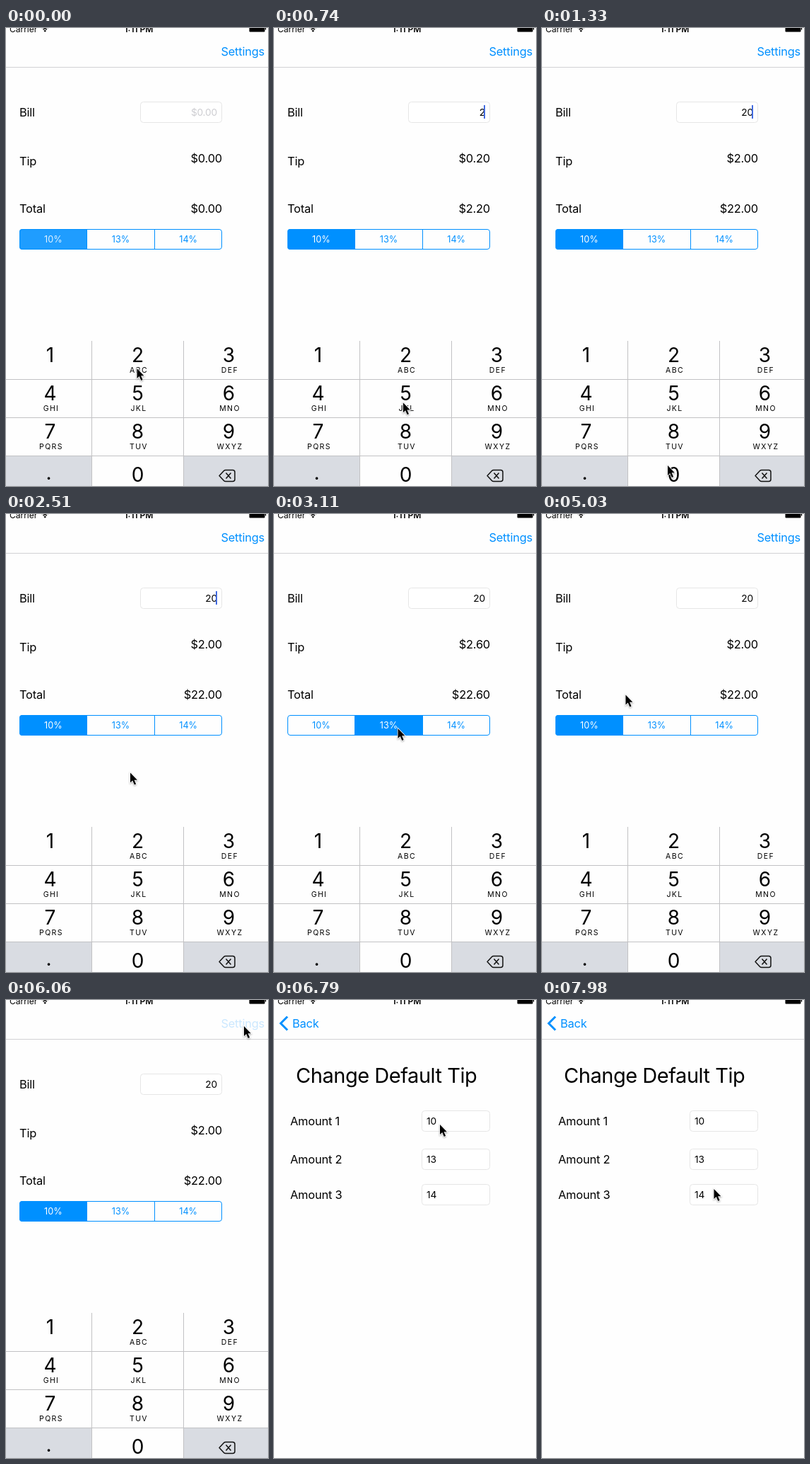
An HTML page that plays this animation: 371x647 px, repeating every 8 s.

```html
<!DOCTYPE html>
<html lang="en">
<head>
<meta charset="utf-8">
<title>Tip calculator</title>
<style>
  html, body { margin: 0; width: 100%; height: 100%; overflow: hidden; background: #fefefe; }
  svg { display: block; width: 100vw; height: 100vh; }
  text { font: 16.4px Inter, sans-serif; letter-spacing: -.012em; white-space: pre; }
  .small { font-size: 13.7px; }
  .segment { font-size: 12.7px; letter-spacing: 0; }
  .title { font-size: 29px; letter-spacing: -.016em; }
  .status { font-size: 12px; letter-spacing: 0; }
  .bold { font-weight: 600; }
  .digit { font-size: 28px; letter-spacing: 0; }
  .letters { font-size: 10.5px; letter-spacing: 1.4px; }
  .blue { fill: #0090ff; }
  .page { fill: #fefefe; }
  .grey { fill: #d9dce2; }
  .field { fill: #fff; stroke: #e6e6e6; }
  .line { fill: none; stroke: #c2c2c4; }
  .end { text-anchor: end; }
  .mid { text-anchor: middle; }
</style>
</head>
<body>
<svg id="stage" viewBox="0 0 371 647"></svg>
<script>
const WIDTH = 371, LOOP = 8000, BLUE = '#0090ff';
const STEP = 147.7; // ms the picture holds; all times below count these steps

const RATES = [10, 13, 14];
const SEGMENT = 287 / 3;

const START = { x: 185.5, y: 481 };
const MOVES = [
  { from: 3, to: 8, x: 178, y: 618 },     // the 0 key
  { from: 12, to: 19, x: 175.5, y: 303 }, // 13%
  { from: 21, to: 24, x: 248, y: 300 },   // 14%
  { from: 26, to: 28, x: 169.5, y: 299 }, // 13%
  { from: 30, to: 32, x: 78, y: 296 },    // 10%
  { from: 32, to: 40, x: 337, y: 37 },    // Settings
  { from: 43, to: 46, x: 235, y: 176 },   // first amount
  { from: 50, to: 54, x: 243.5, y: 267 }, // third amount
];
const SELECTIONS = [
  { at: -1, index: 0 }, { at: 19.5, index: 1 }, { at: 24.5, index: 2 },
  { at: 28, index: 1 }, { at: 31.5, index: 0 },
];

const $ = id => document.getElementById(id);
const clamp = v => Math.max(0, Math.min(1, v));
const smooth = v => v * v * (3 - 2 * v);
const text = (x, y, content, cls = '', id = '') =>
  `<text x="${x}" y="${y}" class="${cls}" id="${id}">${content}</text>`;
const rect = (x, y, w, h, cls, id = '', rx = 0) =>
  `<rect x="${x}" y="${y}" width="${w}" height="${h}" rx="${rx}" class="${cls}" id="${id}"/>`;
const field = (x, y, w) => rect(x + .5, y + .5, w - 1, 29, 'field', '', 4);

const keys = ['', 'ABC', 'DEF', 'GHI', 'JKL', 'MNO', 'PQRS', 'TUV', 'WXYZ'].map((letters, i) => {
  const x = 62.5 + 126.5 * (i % 3) - (i % 3 === 1 ? 2.5 : 0);
  const y = 472 + 54 * Math.floor(i / 3);
  return text(x, y, i + 1, 'digit mid') + text(x + 1.5, y + 15, letters, 'letters mid');
}).join('');

const segments = RATES.map((rate, i) =>
  rect(19 + SEGMENT * i, 284, SEGMENT, 29, 'blue', 'fill' + i) +
  text(19 + SEGMENT * (i + .5), 303, rate + '%', 'segment mid', 'rate' + i)).join('');

const amounts = [156, 210, 260].map((y, i) =>
  text(23, y + 21, 'Amount ' + (i + 1)) + field(209, y, 97) +
  text(216, y + 20, RATES[i], 'small')).join('');

$('stage').innerHTML = `
<clipPath id="round"><rect x="19" y="284" width="287" height="29" rx="4"/></clipPath>
${rect(0, 0, WIDTH, 647, 'page')}
<g id="form">
  ${text(19, 125, 'Bill')}${field(190, 104, 116)}
  ${text(299, 124, '', 'small end', 'bill')}
  <rect x="297" y="109" width="2" height="19" fill="#426be0" id="caret"/>
  ${text(19, 194, 'Tip')}${text(306, 190, '', 'end', 'tip')}
  ${text(19, 261, 'Total')}${text(306, 261, '', 'end', 'total')}
  <g clip-path="url(#round)">${segments}</g>
  <path d="M114.5 284v29M210.5 284v29" stroke="${BLUE}"/>
  <rect x="19.5" y="284.5" width="286" height="28" rx="3.5" fill="none" stroke="${BLUE}"/>
</g>
<g id="keyboard">
  ${rect(0, 442, WIDTH, 205, 'page')}
  ${rect(0, 605, 121, 42, 'grey')}${rect(252, 605, 119, 42, 'grey')}
  ${rect(122, 442, 129, 54, 'grey', 'press2')}${rect(122, 605, 129, 42, 'grey', 'press0')}
  <path class="line" d="M0 496.5h371M0 550.5h371M0 604.5h371M121.5 442v205M251.5 442v205"/>
  ${keys}${text(186.5, 641, '0', 'digit mid')}${text(60.5, 638, '.', 'digit mid')}
  <path d="M302 632.5l6.5-7q1-1 2.5-1h10q3 0 3 3v10q0 3-3 3h-10q-1.5 0-2.5-1zM311.5 628.5l7 8M318.5 628.5l-7 8"
    fill="none" stroke="#111" stroke-width="1.5" stroke-linejoin="round"/>
</g>
<g id="settingsPage">
  ${rect(0, 56, WIDTH, 591, 'page')}
  ${text(31, 117, 'Change Default Tip', 'title')}${amounts}
</g>
${rect(0, 0, WIDTH, 55, 'page')}
<path d="M0 55.5h371" stroke="#d2d2d4"/>
${text(366, 39, 'Settings', 'blue end', 'settings')}
<g id="back">
  <path d="M19 23.5l-9.5 9.5 9.5 9.5" fill="none" stroke="${BLUE}" stroke-width="3"/>
  ${text(26, 39, 'Back', 'blue')}
</g>
${text(5, 5.5, 'Carrier', 'status')}${text(188, 5.5, '1:11 PM', 'status bold mid')}
<path d="M50.5 0q4.7-4 9.4 0M52.5 2.2q2.7-2.2 5.4 0" fill="none" stroke="#000" stroke-width="1.5"/>
<path d="M53.3 3.7q1.900-1.400 3.800 0l-1.900 2z"/>
<path d="M344.500-4h22v8.500q0 1-1 1h-20q-1 0-1-1zM367 0h1.200v2.500h-1.200z"/>
<path id="pointer" d="M0 0v14l3.200-3 2.600 6 2.300-1-2.500-5.800h4.300z" stroke="#fff" stroke-width="1.6"
  paint-order="stroke" style="filter:drop-shadow(0 1px 1px #0005)"/>`;

const show = (id, opacity) => $(id).setAttribute('opacity', +opacity);
const move = (id, x, y = 0) => $(id).setAttribute('transform', `translate(${x} ${y})`);

function pointerAt(step) {
  let { x, y } = START;
  for (const leg of MOVES) {
    const k = smooth(clamp((step - leg.from) / (leg.to - leg.from)));
    x += (leg.x - x) * k;
    y += (leg.y - y) * k;
  }
  return [x, y];
}

function draw(time) {
  const step = Math.floor((time + 8) / STEP);

  const bill = step < 3 ? '' : step < 9 ? '2' : '20';
  const last = SELECTIONS.findLastIndex(({ at }) => step >= at);
  const selected = SELECTIONS[last].index, previous = SELECTIONS[last - 1]?.index;
  const tip = bill * RATES[selected] / 100;
  $('bill').textContent = bill || '$0.00';
  $('bill').setAttribute('fill', bill ? '#000' : '#cdcdd1');
  $('tip').textContent = '$' + tip.toFixed(2);
  $('total').textContent = '$' + (+bill + tip).toFixed(2);

  const fade = clamp((step - SELECTIONS[last].at) * .88);
  RATES.forEach((_, i) => {
    const weight = i === selected ? fade : i === previous ? 1 - fade : 0;
    const touched = i === 1 && step === 19 || i === 2 && step === 24;
    show('fill' + i, touched ? .13 : weight);
    $('rate' + i).style.fill = `color-mix(in srgb, #fff ${weight * 100}%, ${BLUE})`;
  });

  const beat = step * STEP / 1000 % 1;
  show('caret', clamp((beat - .23) * 10) * clamp((.9 - beat) * 10));
  show('press2', step === 2);
  show('press0', step === 8);

  const push = 1 - (1 - clamp((step - 42.7) / 3.3)) ** 3;
  move('form', -.3 * WIDTH * push);
  move('keyboard', -WIDTH * push);
  move('settingsPage', WIDTH * (1 - push));
  move('back', 60 * (1 - push));
  show('back', push);
  show('settings', (step >= 41 ? .2 : 1) * (1 - push));

  move('pointer', ...pointerAt(step));
}

function tick(now) {
  draw(now % LOOP);
  requestAnimationFrame(tick);
}
requestAnimationFrame(tick);
</script>
</body>
</html>
```
